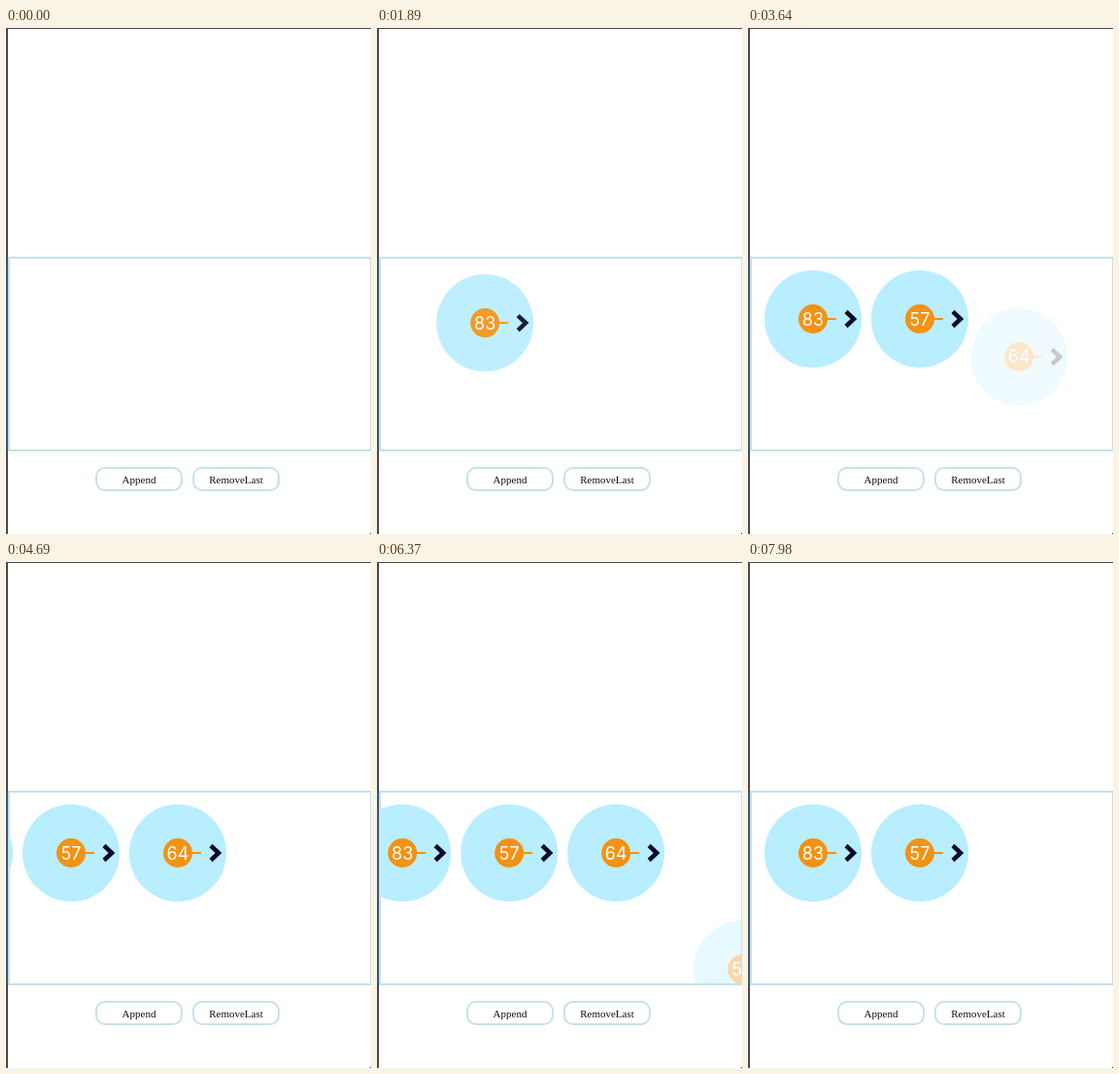
An HTML page with a canvas for the animation above (8 s loop, 376 by 520 pixels).

```html
<!DOCTYPE html>
<html lang="en">
<head>
<meta charset="utf-8">
<title>Linked list</title>
<style>
  html, body { margin: 0; width: 100%; height: 100%; overflow: hidden; background: #fff; }
  canvas { display: block; }
</style>
</head>
<body>
<canvas id="stage" width="376" height="520"></canvas>
<script>
const ctx = document.getElementById('stage').getContext('2d');
const LOOP = 8000, FADE = 1000, STEP = 110, ROW_Y = 299;
const CENTER_AT = 3285, JUMP_AT = 4685, SCROLL_AT = 5795;

const BLUE = [185, 238, 255], ORANGE = [243, 146, 20], NAVY = [7, 8, 40], WHITE = [255, 255, 255];
const BORDER = '#c6e1ea';

const nodes = [
  { value: 83, enter: 1090, leave: Infinity },
  { value: 57, enter: 2120, leave: Infinity },
  { value: 64, enter: 3315, leave: 7137 },
  { value: 58, enter: 4695, leave: SCROLL_AT }
];

// cubic-bezier(.42, 0, .58, 1)
function easeInOut(t) {
  if (t <= 0) return 0;
  if (t >= 1) return 1;
  let lo = 0, hi = 1;
  for (let i = 0; i < 24; i++) {
    const u = (lo + hi) / 2, v = 1 - u;
    const x = 3 * v * v * u * 0.42 + 3 * v * u * u * 0.58 + u * u * u;
    if (x < t) lo = u; else hi = u;
  }
  return lo * lo * (3 - 2 * lo);
}

const progress = (t, start) => easeInOut((t - start) / FADE);

// Fades a colour towards the white page
const tint = (rgb, alpha) =>
  `rgb(${rgb.map(c => Math.round(255 + (c - 255) * alpha)).join(',')})`;

function disc(x, y, r, color) {
  ctx.fillStyle = color;
  ctx.beginPath();
  ctx.arc(x, y, r, 0, Math.PI * 2);
  ctx.fill();
}

function stroke(points, width, color) {
  ctx.strokeStyle = color;
  ctx.lineWidth = width;
  ctx.beginPath();
  points.forEach(([x, y]) => ctx.lineTo(x, y));
  ctx.stroke();
}

function label(text, x, y, font, color) {
  ctx.font = font;
  ctx.fillStyle = color;
  ctx.fillText(text, x, y);
}

function drawNode(value, x, y, alpha) {
  const orange = tint(ORANGE, alpha);
  disc(x, y, 50, tint(BLUE, alpha));
  stroke([[x + 14, y], [x + 24, y]], 2, orange);
  disc(x, y, 15, orange);
  label(value, x, y + 6.5, '18px Inter, Roboto, sans-serif', tint(WHITE, alpha));
  stroke([[x + 34, y - 7.5], [x + 42, y], [x + 34, y + 7.5]], 4.5, tint(NAVY, alpha));
}

function drawButton(text, x) {
  ctx.strokeStyle = BORDER;
  ctx.lineWidth = 2;
  ctx.beginPath();
  ctx.roundRect(x + 1, 452, 88, 23, 9);
  ctx.stroke();
  label(text, x + 45, 467.5, '11px "Liberation Serif", "Times New Roman", serif', '#111');
}

function rowStart(t) {
  if (t < CENTER_AT) return 112;
  if (t < JUMP_AT) return 67;
  return 67 - STEP * (1 - progress(t, SCROLL_AT));
}

function drawRow(t) {
  const start = rowStart(t);
  ctx.save();
  ctx.beginPath();
  ctx.rect(3, 237, 372, 196);
  ctx.clip();
  nodes.forEach(({ value, enter, leave }, i) => {
    const away = 1 - progress(t, enter), gone = progress(t, leave);
    const alpha = (1 - away) * (1 - gone);
    if (alpha <= 0) return;
    drawNode(value, start + i * STEP - 10 * away + 32 * gone,
      ROW_Y + 50 * away + 190 * gone, alpha);
  });
  ctx.restore();
}

function drawFrame() {
  ctx.fillStyle = '#fff';
  ctx.fillRect(0, 0, 376, 520);
  ctx.fillStyle = '#48484c';
  ctx.fillRect(0, 0, 376, 1);
  ctx.fillRect(0, 0, 2, 520);
  ctx.fillRect(375, 519, 1, 1);
  ctx.fillStyle = '#40546c';
  ctx.fillRect(0, 236, 2, 198);
  ctx.strokeStyle = BORDER;
  ctx.lineWidth = 2;
  ctx.strokeRect(3, 236, 373, 198);
}

function render(t) {
  ctx.textAlign = 'center';
  drawFrame();
  drawRow(t);
  drawButton('Append', 92);
  drawButton('RemoveLast', 192);
}

const begin = performance.now();
function tick() {
  render((performance.now() - begin) % LOOP);
  requestAnimationFrame(tick);
}
tick();
</script>
</body>
</html>
```
